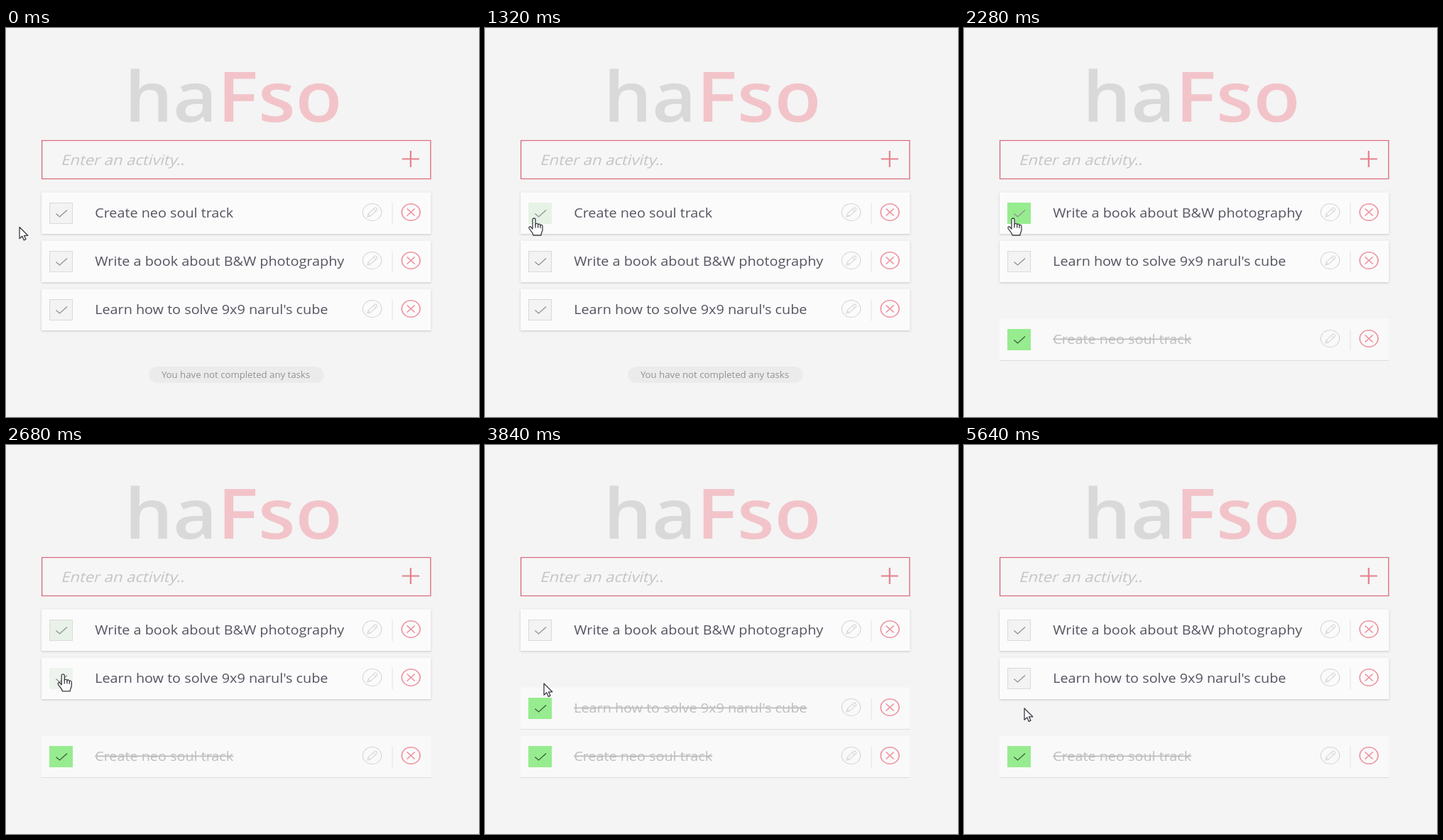
An HTML page for the animation above (5680 ms loop, 666 by 548 pixels).

```html
<!DOCTYPE html>
<html lang="en">
<head>
<meta charset="utf-8">
<title>Task list</title>
<style>
  html, body { margin: 0; width: 100%; height: 100%; overflow: hidden; background: #f4f4f4; }
  svg { display: block; width: 666px; height: 548px; font-family: "Open Sans", "Noto Sans", sans-serif; }
  .title { font-size: 98px; font-weight: 600; }
  .label { font-size: 18px; fill: #555562; }
  .done .label { fill: #bebebe; text-decoration: line-through; }
  .card { fill: #fbfbfb; filter: drop-shadow(0 1.5px 1.5px rgba(0, 0, 0, .18)); }
  .done .card { fill: #f9f9f9; filter: none; }
  .rule { stroke: none; }
  .done .rule { stroke: #dedede; }
  .tick { fill: none; stroke: #8f8f8f; stroke-width: 1.1; }
  .done .tick { stroke: #3c5a3c; }
  .edit { fill: none; stroke: #d4d4d4; }
  .remove { fill: none; stroke: #ee95a0; stroke-width: 1.6; }
  .cursor { fill: #fcfcfc; stroke: #3c3c46; stroke-width: 1.3; stroke-linejoin: round; stroke-linecap: round; }
</style>
</head>
<body>
<svg viewBox="0 0 666 548">
  <!-- the page is shown a tenth wider than tall -->
  <g transform="scale(1.1 1)">
    <text class="title" x="151.5" y="132" fill="#d9d9d9">ha<tspan fill="#f2c4ca">Fso</tspan></text>
    <rect x="46" y="158.5" width="497.5" height="54" fill="#f6f6f6" stroke="#d9697a" stroke-width="1.2"/>
    <text transform="translate(70 193) skewX(-14)" font-size="20" fill="#c4c4c4">Enter an activity..</text>
    <path d="M507 184.5h22M518 173v23" stroke="#e5808c" stroke-width="2"/>
    <g id="rows"></g>
    <g id="notice">
      <rect x="183" y="477" width="224" height="23" rx="11.5" fill="#ebebeb"/>
      <text x="199" y="493" font-size="12" fill="#929292">You have not completed any tasks</text>
    </g>
  </g>
  <path id="arrow" class="cursor" d="M0 0V16.2L3.8 12.8 6.3 18.4 9 17.2 6.5 11.8H11.8Z"/>
  <g id="hand" class="cursor">
    <path d="M-2 2C-2-.7 2-.7 2 2V9C2 6.7 5.7 6.8 5.7 9.3 6 7.4 9 7.8 9 10.2 9.5 8.7 12 9.2 12 11.5V16C12 19 10 20 10 24H-1C-1 21-4.8 18-6.8 14.5-8 12-5.5 10.8-4 12.7L-2 15Z"/>
    <path d="M2 9v4M5.7 9.5V13M9 10.5V13.5" fill="none"/>
  </g>
</svg>
<script>
const LOOP = 5680, STEP = 40, FADE = 300;
const CHECK_FIRST = 1880, CHECK_LAST = 3400, UNCHECK_LAST = 4480;
const labels = ["Create neo soul track", "Write a book about B&W photography", "Learn how to solve 9x9 narul's cube"];

// Pointer moves: start, end, x, y
const moves = [[1030, 1320, 69, 268], [2400, 2790, 83, 336], [3880, 4200, 85, 371]];
// Checkbox hovers: task, start, end
const hovers = [[0, 1275, CHECK_FIRST], [1, 1860, 2455], [2, 2655, CHECK_LAST], [2, 4060, UNCHECK_LAST]];

const byId = id => document.getElementById(id);
const clamp = v => Math.max(0, Math.min(1, v));
const smooth = u => u * u * (3 - 2 * u);
const fade = ms => smooth(clamp(ms / FADE)) ** 0.7;
const mix = (a, b, u) => `rgb(${a.map((v, i) => Math.round(v + (b[i] - v) * u))})`;
const idle = [243, 243, 243], green = [151, 236, 143];

const rows = labels.map(label => {
  const row = document.createElementNS("http://www.w3.org/2000/svg", "g");
  row.innerHTML = `
    <rect class="card" x="45.5" width="498.5" height="58.5"/>
    <path class="rule" d="M45.5 59H544"/>
    <rect class="box" x="56" y="15" width="29" height="29"/>
    <path class="tick" d="M64 30l4.7 4.5L78.2 25"/>
    <text class="label" x="113.8" y="35.2"></text>
    <g class="edit" transform="translate(468.7 28)">
      <circle r="12"/>
      <path d="M-6 6.5L-5 2.5 3-6Q4.2-7 5.4-6L6-5Q7-3.8 6-2.6L-2.5 5.5ZM1.5-4.5L4.5-1.5M-5 2.5L-2.5 5.5"/>
    </g>
    <path d="M494.5 15v30" stroke="#e4e4e4"/>
    <g class="remove" transform="translate(518.3 28)">
      <circle r="11.7"/>
      <path d="M-5-5L5 5M5-5L-5 5"/>
    </g>`;
  row.querySelector(".label").textContent = label;
  byId("rows").append(row);
  return { row, box: row.querySelector(".box") };
});

function glow(task, t) {
  let level = 0;
  for (const [id, start, end] of hovers) {
    if (id === task && t >= start) level = fade(t - start) * (1 - fade(t - end));
  }
  return level;
}

function drawRows(t) {
  const lastDone = t >= CHECK_LAST && t < UNCHECK_LAST;
  const firstDone = t >= CHECK_FIRST;
  const order = !firstDone ? [0, 1, 2] : [1, 2, 0];
  order.forEach((task, slot) => {
    const { row, box } = rows[task];
    const done = task === 0 ? firstDone : task === 2 && lastDone;
    const hovered = hovers.some(([id, start, end]) => id === task && t >= start && t < end);
    row.setAttribute("transform", `translate(0 ${231.5 + slot * 68 + (done ? 42 : 0)})`);
    row.setAttribute("class", done ? "done" : "");
    // A task that has been moved between lists starts without a fade.
    const level = done ? 1 : task === 2 && t >= UNCHECK_LAST ? 0 : glow(task, t);
    const fill = mix(idle, green, level);
    box.setAttribute("fill", fill);
    box.setAttribute("stroke", done || hovered ? fill : "#dadada");
  });
  byId("notice").style.display = firstDone ? "none" : "";
}

function drawPointer(t) {
  let x = 19, y = 280.5;
  for (const [start, end, toX, toY] of moves) {
    const u = smooth(clamp((t - start) / (end - start)));
    x += (toX - x) * u;
    y += (toY - y) * u;
  }
  const pointing = hovers.some(([, start, end]) => t >= start && t < end);
  for (const [id, shown] of [["hand", pointing], ["arrow", !pointing]]) {
    byId(id).style.display = shown ? "" : "none";
    byId(id).setAttribute("transform", `translate(${x} ${y})`);
  }
}

const began = performance.now();
function draw(now) {
  const t = Math.floor((Math.max(0, now - began) % LOOP) / STEP) * STEP;
  drawRows(t);
  drawPointer(t);
  requestAnimationFrame(draw);
}
draw(began);
</script>
</body>
</html>
```
